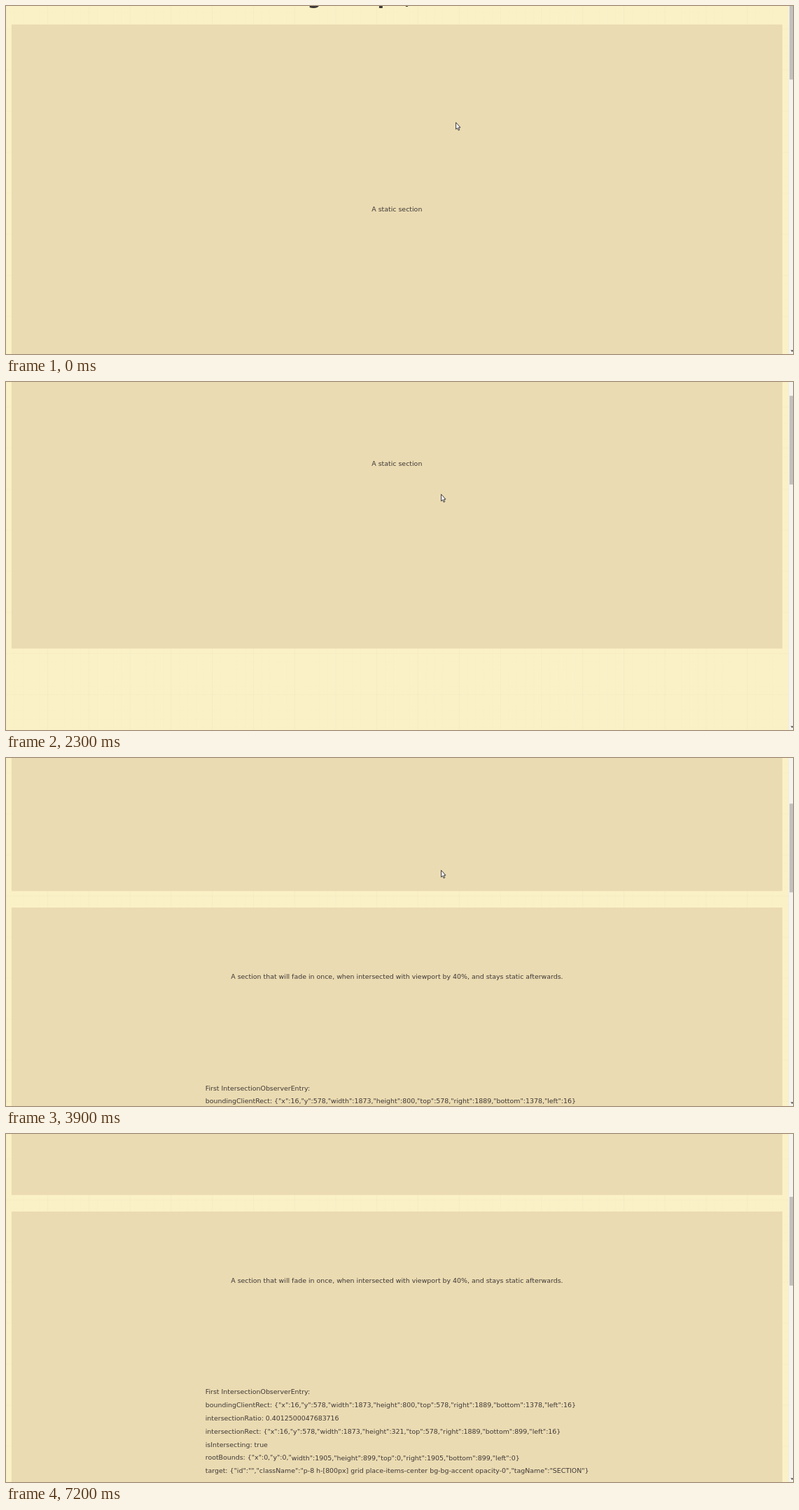
Write an HTML page that moves like this. It is 1124 px wide and 498 px high and loops after 7400 ms.

```html
<!DOCTYPE html>
<html lang="en">
<head>
<meta charset="utf-8">
<title>Fade-in on scroll</title>
<style>
  html, body { margin: 0; width: 100%; height: 100%; overflow: hidden; background: #fbf1c7; }
  #stage { position: absolute; left: 0; top: 0; width: 1124px; height: 498px; overflow: hidden; }

  /* The page is laid out at full size and scaled down as a whole. */
  #page {
    position: absolute; left: 0; top: 0; width: 1905px; height: 0;
    transform-origin: 0 0;
    font: 16px/32px "DejaVu Sans", sans-serif; color: #3c3836;
  }
  #grid {
    position: absolute; left: 0; top: -100px; width: 1905px; height: 1900px;
    --major: rgba(60, 56, 54, .018);
    --minor: rgba(60, 56, 54, .005);
    background-image:
      linear-gradient(var(--major) 2px, transparent 2px),
      linear-gradient(90deg, var(--major) 2px, transparent 2px),
      linear-gradient(var(--minor) 2px, transparent 2px),
      linear-gradient(90deg, var(--minor) 2px, transparent 2px);
    background-size: 100px 100px, 100px 100px, 20px 20px, 20px 20px;
    background-position: 3px 10px;
  }
  #page b { position: absolute; top: -92.5px; font-size: 48px; line-height: 48px; }
  /* A hair of rotation keeps text off the whole-pixel baseline grid. */
  #page b, section > div { transform: rotate(.005deg); }
  section {
    position: absolute; left: 16px; width: 1873px; box-sizing: border-box; padding: 32px;
    display: grid; place-items: center; background: #ebdbb2; white-space: nowrap;
  }
  #first { top: 0; height: 899px; }
  #second { top: 939px; height: 800px; }

  #track { position: absolute; left: 1118px; top: 0; width: 6px; height: 498px; background: #f3f3f2; }
  #thumb { position: absolute; left: 1px; top: 0; width: 5px; height: 126.8px; background: #c1c1c1; }
  #arrow { position: absolute; left: 1120px; top: 492px; }
  #cursor { position: absolute; left: 0; top: 0; overflow: visible; }
</style>
</head>
<body>
<div id="stage">
  <div id="page">
    <div id="grid"></div>
    <b style="left:735px">g</b><b style="left:905px">p</b><b style="left:971px">,</b>
    <section id="first"><div>A static section</div></section>
    <section id="second">
      <div>A section that will fade in once, when intersected with viewport by 40%, and stays static afterwards.</div>
      <div>
        <div>First IntersectionObserverEntry:</div>
        <div>boundingClientRect: {"x":16,"y":578,"width":1873,"height":800,"top":578,"right":1889,"bottom":1378,"left":16}</div>
        <div>intersectionRatio: 0.4012500047683716</div>
        <div>intersectionRect: {"x":16,"y":578,"width":1873,"height":321,"top":578,"right":1889,"bottom":899,"left":16}</div>
        <div>isIntersecting: true</div>
        <div>rootBounds: {"x":0,"y":0,"width":1905,"height":899,"top":0,"right":1905,"bottom":899,"left":0}</div>
        <div>target: {"id":"","className":"p-8 h-[800px] grid place-items-center bg-bg-accent opacity-0","tagName":"SECTION"}</div>
      </div>
    </section>
  </div>
  <div id="track"><div id="thumb"></div></div>
  <svg id="arrow" width="5" height="4"><path d="M.5 .5H5L2.75 3Z" fill="#505050"/></svg>
  <svg id="cursor" width="8" height="13">
    <path d="M.6 .7V10.4L2.7 8.5L4.2 12L5.7 11.3L4.3 7.9H7Z" fill="#fff" stroke="#26252c" stroke-width=".9" stroke-linejoin="round"/>
  </svg>
</div>
<script>
  const LOOP = 7400, STEP = 100;
  const SCALE = 0.5878, LEFT = -1.5, TOP = 26.5;
  const NOTCH = 31.17;   // stage pixels per wheel notch
  const RISE = 50;       // page pixels the second section travels while fading

  // Bursts of the mouse wheel; ease is the ease-out exponent.
  const bursts = [
    { from: 800, to: 1900, notches: 5, ease: .94 },
    { from: 2200, to: 2400, notches: 1, ease: 1.2 },
    { from: 2500, to: 3300, notches: 4, ease: 1.4 },
    { from: 3600, to: 4400, notches: 4, ease: 1.17 },
    { from: 4500, to: 4700, notches: 1, ease: 1.06 }
  ];
  const start = { x: 642, y: 166 };
  const glides = [
    { from: 0, to: 200, x: 621, y: 160 },
    { from: 4700, to: 5300, x: 712, y: 269 },
    { from: 5300, to: 5500, x: 476, y: 177 },
    { from: 5600, to: 5700, x: 497, y: 277 },
    { from: 5800, to: 5900, x: 682, y: 241 },
    { from: 6000, to: 6100, x: 532, y: 210 },
    { from: 6200, to: 6400, x: 534, y: 224 },
    { from: 6600, to: 7200, x: -55, y: -45 }
  ];

  const progress = (t, { from, to }) => Math.min(1, Math.max(0, (t - from) / (to - from)));

  const scrollAt = t => NOTCH * bursts.reduce(
    (sum, b) => sum + b.notches * (1 - (1 - progress(t, b)) ** b.ease), 0);

  const pointerAt = t => glides.reduce((p, g) => {
    const k = progress(t, g);
    return { x: p.x + (g.x - p.x) * k, y: p.y + (g.y - p.y) * k };
  }, start);

  const $ = id => document.getElementById(id);
  const page = $('page'), second = $('second'), thumb = $('thumb'), cursor = $('cursor');

  function draw(now) {
    const t = Math.floor((now % LOOP) / STEP) * STEP;
    const scroll = scrollAt(t), pointer = pointerAt(t);
    const shown = progress(t, { from: 2950, to: 3450 });
    page.style.transform = `translate(${LEFT}px, ${TOP - scroll}px) scale(${SCALE})`;
    second.style.opacity = shown;
    second.style.transform = `translateY(${RISE * (1 - shown)}px)`;
    thumb.style.transform = `translateY(${scroll * .2387 - 21.7}px)`;
    cursor.style.transform = `translate(${pointer.x}px, ${pointer.y}px)`;
  }

  function tick() {
    draw(performance.now());
    requestAnimationFrame(tick);
  }
  tick();
</script>
</body>
</html>
```
